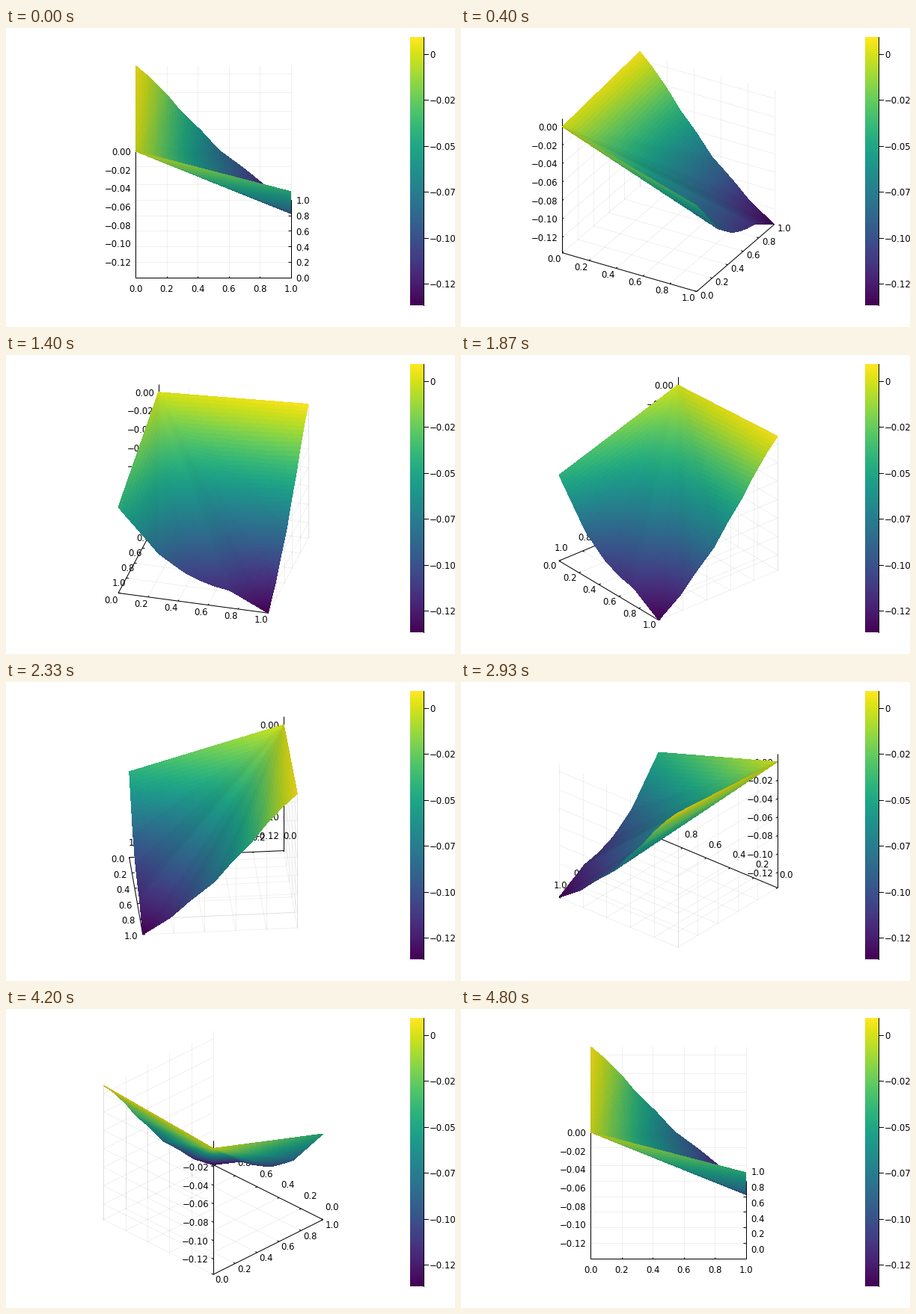
These frames come from a looping animation (600x400 px, 4.87 s). A matplotlib script:

```python
import numpy as np
import matplotlib.pyplot as plt
from matplotlib.animation import FuncAnimation
from matplotlib.collections import LineCollection, PolyCollection

W, H, DPI = 600, 400, 100
PX = 72 / DPI                      # one pixel in points
LOOP, POSES, TURN = 4870, 73, 5    # ms, camera poses, degrees per pose
HOLD = 3                           # animation frames per pose
CX, CY, SIDE = 277.0, 192, 207.3   # centre and edge length of the cube
ELEV = np.radians(30)
ZMIN, ZMAX = -0.1368, 0.0089
CELLS = 56
FONT = dict(family="DejaVu Sans", fontsize=8.4, color="black")

# Height along the edges x = 1 and y = 1; linear on every ray from the origin.
EDGE_X = np.array([(0, -.0437), (.27, -.0883), (.38, -.099), (.46, -.1063),
                   (.56, -.1118), (.64, -.1152), (.745, -.1179), (1, ZMIN)]).T
EDGE_Y = np.array([(0, ZMAX), (.09, -.004), (.2, -.0225), (.295, -.0415),
                   (.42, -.0615), (.536, -.0828), (.7, -.103),
                   (.82, -.1195), (1, ZMIN)]).T

TICKS = np.arange(6) / 5
Z_TICKS = -np.arange(7) * 0.02


def unit(z):
    return (z - ZMIN) / (ZMAX - ZMIN)


def height(x, y):
    r = np.maximum(np.maximum(x, y), 1e-9)
    return r * np.where(y <= x, np.interp(y / r, *EDGE_X),
                        np.interp(x / r, *EDGE_Y))


def project(p, az):
    """Cube coordinates (..., 3) to stage pixels (..., 2)."""
    x, y, z = np.moveaxis(np.asarray(p, float) - 0.5, -1, 0)
    c, s = np.cos(az), np.sin(az)
    depth = y * c - x * s
    up = depth * np.sin(ELEV) + z * np.cos(ELEV)
    return np.stack([CX + SIDE * (x * c + y * s), CY - SIDE * up], -1)


def minus(text):
    return text.replace("-", "\u2212")


def grid_segments():
    segs = []
    for t in TICKS:
        segs += [((t, 0, 0), (t, 1, 0)), ((t, 1, 0), (t, 1, 1)),
                 ((0, t, 0), (1, t, 0)), ((0, t, 0), (0, t, 1))]
    for z in unit(Z_TICKS):
        segs += [((0, 0, z), (0, 1, z)), ((0, 1, z), (1, 1, z))]
    return np.array(segs)


def axis_segments(tick=0.016):
    segs = [((0, 0, 0), (1, 0, 0)), ((1, 0, 0), (1, 1, 0)), ((0, 0, 0), (0, 0, 1))]
    for t in TICKS:
        segs += [((t, 0, 0), (t, tick, 0)), ((1, t, 0), (1 - tick, t, 0))]
    segs += [((0, 0, z), (0, tick, z)) for z in unit(Z_TICKS)]
    return np.array(segs)


def label_offset(phase):
    """Label centre relative to its tick; alignment jumps between sectors."""
    if phase > 360:
        phase -= 360
    a = np.radians(phase)
    dx, dy = 7 * np.cos(a), 8 * np.sin(a)
    side = 9 - 2 * abs(np.sin(2 * a))
    if phase == 90:
        return dx, dy + 6
    if phase > 180:
        return dx + side, dy - 12.5
    return dx + (side if phase < 90 else -side), dy + 0.5


# Surface facets with their base colours and normals
g = np.linspace(0, 1, CELLS + 1)
gx, gy = np.meshgrid(g, g, indexing="ij")
pts = np.stack([gx, gy, unit(height(gx, gy))], -1)
corners = [pts[:-1, :-1], pts[1:, :-1], pts[1:, 1:], pts[:-1, 1:]]
quads = np.stack(corners, 2).reshape(-1, 4, 3)
mid = quads.mean(1)
normals = np.cross(quads[:, 2] - quads[:, 0], quads[:, 3] - quads[:, 1])
normals /= np.linalg.norm(normals, axis=1, keepdims=True)
base = plt.get_cmap("viridis")(mid[:, 2])[:, :3]

fig = plt.figure(figsize=(W / DPI, H / DPI), dpi=DPI, facecolor="white")
ax = fig.add_axes([0, 0, 1, 1])

# Colour bar
ax.imshow(np.linspace(1, 0, 256)[:, None], cmap="viridis", aspect="auto",
          extent=(540, 558, 371, 12), vmin=0, vmax=1)
ax.plot([558, 558], [12, 371], color="black", lw=PX)
for i in range(6):
    y = 34.6 + 61.5 * i
    ax.plot([558, 564], [y, y], color="black", lw=PX)
    text = minus(f"{-0.025 * i:.3f}") if i else "0"
    ax.text(566, y, text, ha="left", va="center_baseline", **FONT)

ax.set_xlim(0, W)
ax.set_ylim(H, 0)
ax.axis("off")

grid_3d, axes_3d = grid_segments(), axis_segments()
grid = LineCollection([], colors=[(0, 0, 0, 0.06)], linewidths=PX, zorder=1)
axes = LineCollection([], colors="black", linewidths=PX, zorder=2)
surface = PolyCollection([], linewidths=0, antialiaseds=False, zorder=4)
surface.set_snap(False)
for item in (grid, axes, surface):
    ax.add_collection(item, autolim=False)


def make_labels(texts, ha):
    return [ax.text(0, 0, t, ha=ha, va="center_baseline", zorder=3, **FONT)
            for t in texts]


x_labels = make_labels([f"{t:.1f}" for t in TICKS], "center")
y_labels = make_labels([f"{t:.1f}" for t in TICKS], "center")
z_labels = make_labels([minus(f"{-0.02 * i:.2f}") if i else "0.00"
                        for i in range(7)], "right")
x_spots = [(t, 0, 0) for t in TICKS]
y_spots = [(1, t, 0) for t in TICKS]
z_spots = [(0, 0, z) for z in unit(Z_TICKS)]


def place(labels, spots, az, offset):
    for label, pos in zip(labels, project(spots, az) + offset):
        label.set_position(pos)


def draw(i):
    # The camera steps within the last part of each hold, never late
    deg = min((i + 1) // HOLD, POSES - 1) * TURN
    az = np.radians(deg)
    grid.set_segments(project(grid_3d, az))
    axes.set_segments(project(axes_3d, az))
    place(x_labels, x_spots, az, label_offset(deg + 90))
    place(y_labels, y_spots, az, label_offset(deg))
    place(z_labels, z_spots, az, (-6, 0))

    # Far facets first, dimmed where seen at a grazing angle
    order = np.argsort(mid[:, 0] * np.sin(az) - mid[:, 1] * np.cos(az))
    view = np.array([np.sin(az) * np.cos(ELEV), -np.cos(az) * np.cos(ELEV),
                     np.sin(ELEV)])
    shade = 0.8 + 0.2 * np.abs(normals @ view)
    surface.set_verts(project(quads[order], az))
    surface.set_facecolor((base * shade[:, None])[order])
    return [grid, axes, surface, *x_labels, *y_labels, *z_labels]


anim = FuncAnimation(fig, draw, frames=POSES * HOLD,
                     interval=LOOP / (POSES * HOLD),
                     repeat=True, repeat_delay=0)
plt.show()
```
